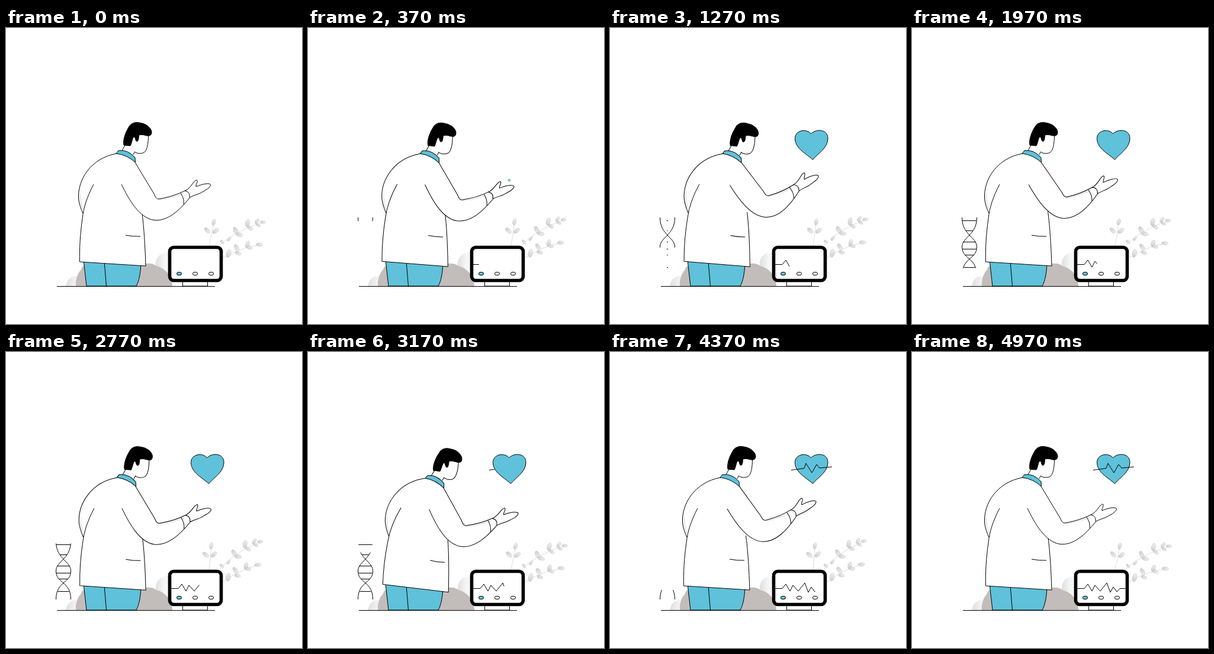
An HTML page for the animation above (5010 ms loop, 500 by 500 pixels).

```html
<!DOCTYPE html>
<html lang="en">
<head>
<meta charset="utf-8">
<title>Doctor and heart monitor</title>
<style>
html, body { margin: 0; width: 100%; height: 100%; overflow: hidden; background: #fff; }
svg { display: block; width: 100vw; height: 100vh; }
.line { fill: none; stroke: #000; stroke-width: 1; stroke-linejoin: round; }
.white { fill: #fff; }
.blue { fill: #5fc1da; }
.bare { stroke: none; }
.shade { fill: none; stroke: #ececec; stroke-width: 3; }
.stem { fill: none; stroke: #aaa; stroke-width: .6; stroke-dasharray: 2 1; }
</style>
</head>
<body>
<svg viewBox="0 0 500 500" xmlns="http://www.w3.org/2000/svg">
  <defs>
    <linearGradient id="leaf"><stop stop-color="#cfcfcf"/><stop offset="1" stop-color="#f0f0f0"/></linearGradient>
    <linearGradient id="puff"><stop stop-color="#dedede"/><stop offset=".6" stop-color="#f6f6f6"/></linearGradient>
  </defs>

  <path d="M101 436 C103 424 110 418 122 419 L134 436 Z" fill="url(#puff)"/>
  <path d="M253 403 C251 387 262 378 275 379 L277 415 Z" fill="url(#puff)"/>
  <path d="M118 436 C117 425 121 414 127 408 C128 398 150 396 165 400 L222 404 C232 396 248 396 254 402 C270 406 281 420 281 436 Z" fill="#c2bdba"/>

  <g id="plants"></g>

  <g class="line">
    <rect class="white" x="298.5" y="428" width="42" height="8"/>
    <rect class="white" x="276.5" y="370.5" width="87" height="56" rx="7" stroke-width="5.6" style="stroke-width:5.6"/>
    <rect class="blue" x="288.5" y="412.5" width="8" height="5" rx="2.5"/>
    <rect class="white" x="315.5" y="412.5" width="8" height="5" rx="2.5"/>
    <rect class="white" x="342.5" y="412.5" width="8" height="5" rx="2.5"/>
    <path id="screenPulse" pathLength="100" d="M279 399.500H291L297 392L304 404L309 394L318 404L329 390L335 406L340 397L346 405L351 399.500H361"/>
  </g>

  <g id="dna" class="line"></g>

  <g class="line">
    <path class="blue" d="M131 392 L136 436 H220 C225 427 227 415 228 398 Z"/>
    <path d="M166 394 L169.500 436"/>
    <path d="M86 436.500 H353" style="stroke-width:1.2"/>
  </g>

  <g id="torso" class="line">
    <path class="white bare" d="M197 200 L195 212 L217 222 L218 209 C224 213 236 213 239 200 L241 178 L212 175 Z"/>
    <path d="M201 198 L196 207 M240.500 181 C240.500 197 238 207 233 210.500 C227 213 220 212 217.500 209 L215 214"/>
    <path fill="#000" d="M199 198 C197 189 202 176 207 168 C211 160 219 158 228 160.500 C238 162 246 170 246 176 C246 182 242 183 236 181.500 C231 180 227 180 224.500 181 C224 187 224 191 221 191.500 C218 191 219 184 216 184 C213 186 213 194 210 199 Z"/>
    <path class="white bare" d="M187 212 C143 220 121 256 122.500 288 C124 300 127 306 130 313 C126 342 124 370 124.500 395 L236 402 L230 300 L218 227 Z"/>
    <path d="M187 212 C143 220 121 256 122.500 288 C124 300 127 306 130 313 M148 264 C137 285 131 303 129 322 C125 350 124 373 124.500 395 L236 402 C235 370 233 335 229.500 310 M202 350 Q215 352.500 227 352"/>
    <path class="shade" d="M125 280 C125 293 128 302 130 308"/>
    <path class="blue" d="M190 207 Q206 205 218 219 L218.500 227 Q204 214 186 212 Z"/>
    <g id="arm">
      <path class="white bare" d="M218 227 L250 280 C253 287 255 290 260 288.500 C275 286 290 281 302 275 L310 287 C293 308 273 327 250 324.500 C225 321 207 289 195 264 Z"/>
      <path class="shade" d="M258 290 C275 288 289 284 300 279"/>
      <path d="M218 227 L250 280 C253 287 255 290 260 288.500 C275 286 290 281 302 275 M195 264 C207 289 225 321 250 324.500 C273 327 293 308 310 287 M295 279 C299 285 301 291 300 298"/>
      <path class="white" d="M302 275 C313 271 317 256 322.500 257 C325 260 320 264 321 268 C330 264 343 261 345.500 264.500 C346 270 335 275 327 279.500 C321 282 316 283 310 286.500 C311 280 308 276 302 275 Z"/>
    </g>
  </g>

  <g id="heart" class="line">
    <path class="blue" d="M342.500 222.500 C333 213 312.500 204 312.500 186.500 C312.500 173 331 169 339.500 178.500 C350 169 368 172 368 186 C368 203 352 211 342.500 222.500 Z"/>
  </g>
  <path id="heartPulse" class="line" pathLength="100" d="M306 199.500 L328 196.500 L331 188 L341 204 L349 190 L354 196 L375 194"/>
</svg>

<script>
const LOOP = 5010;
const HALF = LOOP / 2;
const $ = id => document.getElementById(id);

function add(parent, tag, attrs) {
  const node = document.createElementNS("http://www.w3.org/2000/svg", tag);
  for (const key in attrs) node.setAttribute(key, attrs[key]);
  return parent.appendChild(node);
}

// Leaves: x, y, angle, half-length
const plants = [
  { base: [343, 368], stem: "M343 368 Q347 350 351 328",
    leaves: [[340, 342, 45, 6], [354, 343, -35, 6], [351, 328, -75, 5.5]] },
  { base: [362, 366], stem: "M362 366 Q392 339 438 328",
    leaves: [[365, 361.5, 50, 4], [377, 356.5, -50, 4], [388, 342.5, 65, 6.5], [394, 349, 15, 6],
             [408, 329.5, -75, 6.5], [412, 338, 35, 5], [424, 326.5, -55, 5], [426, 333, 30, 4], [434, 328, 0, 4.5]] },
  { base: [367, 388], stem: "M367 388 Q398 370 433 366",
    leaves: [[376, 381, -75, 7], [389.500, 371, 60, 6], [392, 380.5, 20, 5],
             [408, 365.5, -70, 6], [411, 371, 20, 5], [428, 366, 5, 5.5]] }
];
for (const plant of plants) {
  plant.group = add($("plants"), "g", {});
  add(plant.group, "path", { class: "stem", d: plant.stem });
  for (const [x, y, angle, size] of plant.leaves)
    add(plant.group, "ellipse", {
      rx: size, ry: size * .52, fill: "url(#leaf)", stroke: "#b5b5b5", "stroke-width": .4,
      transform: `translate(${x} ${y}) rotate(${angle})`
    });
}

const strands = [[84.5, 109.5], [109.5, 84.5]].map(([a, b]) => add($("dna"), "path", {
  pathLength: 100,
  d: `M${a} 320C${a} 350 ${b} 353 ${b} 370C${b} 391 ${a} 387 ${a} 418`
}));
// Rungs: y, half-width
const rungs = [[325, 12], [342, 6], [361, 10.5], [373, 12], [383, 8], [404, 9.5]]
  .map(([y, half]) => ({ y, half, node: add($("dna"), "path", {}) }));

const ramp = (t, from, to) => Math.min(1, Math.max(0, (t - from) / (to - from)));
const ease = (t, from, to) => (1 - Math.cos(Math.PI * ramp(t, from, to))) / 2;

function trim(path, start, end) {
  path.style.display = end - start > .002 ? "" : "none";
  path.setAttribute("stroke-dasharray", `${(end - start) * 100} 200`);
  path.setAttribute("stroke-dashoffset", -start * 100);
}

const turn = (node, angle, x, y) => node.setAttribute("transform", `rotate(${angle} ${x} ${y})`);

function draw(t) {
  const lean = ease(t, 150, 800) - ease(t, 800, 1550) + ease(t, 2650, 3280) - ease(t, 3280, 4000);
  turn($("torso"), 3.5 * lean, 170, 425);

  const phase = t % HALF;
  const lift = ease(phase, 450, 1350) - ease(phase, 1500, 2400);
  turn($("arm"), -7.5 * lift, 205, 230);

  const sway = (1 - Math.cos(t / LOOP * 6 * Math.PI)) / 2;
  for (const { group, base } of plants) turn(group, -8 * sway, ...base);

  const grow = ease(t, 250, 900);
  $("heart").setAttribute("transform", `translate(340 263) scale(${grow}) translate(-340 -263)`);
  trim($("heartPulse"), 0, ease(t, 2900, 4250));
  trim($("screenPulse"), 0, t / 5000 > 1 ? 1 : t / 5000);

  for (const strand of strands) trim(strand, ease(t, HALF, 4980), ease(t, 0, HALF));
  const open = ease(t, 1100, 1900) - ease(t, 3100, 3980);
  for (const { y, half, node } of rungs) {
    const w = half * open;
    node.setAttribute("d", w > .1 ? `M${97 - w} ${y + .5}H${97 + w}` : "");
  }
}

const started = performance.now();
function tick() {
  draw((performance.now() - started) % LOOP);
  requestAnimationFrame(tick);
}
tick();
</script>
</body>
</html>
```
